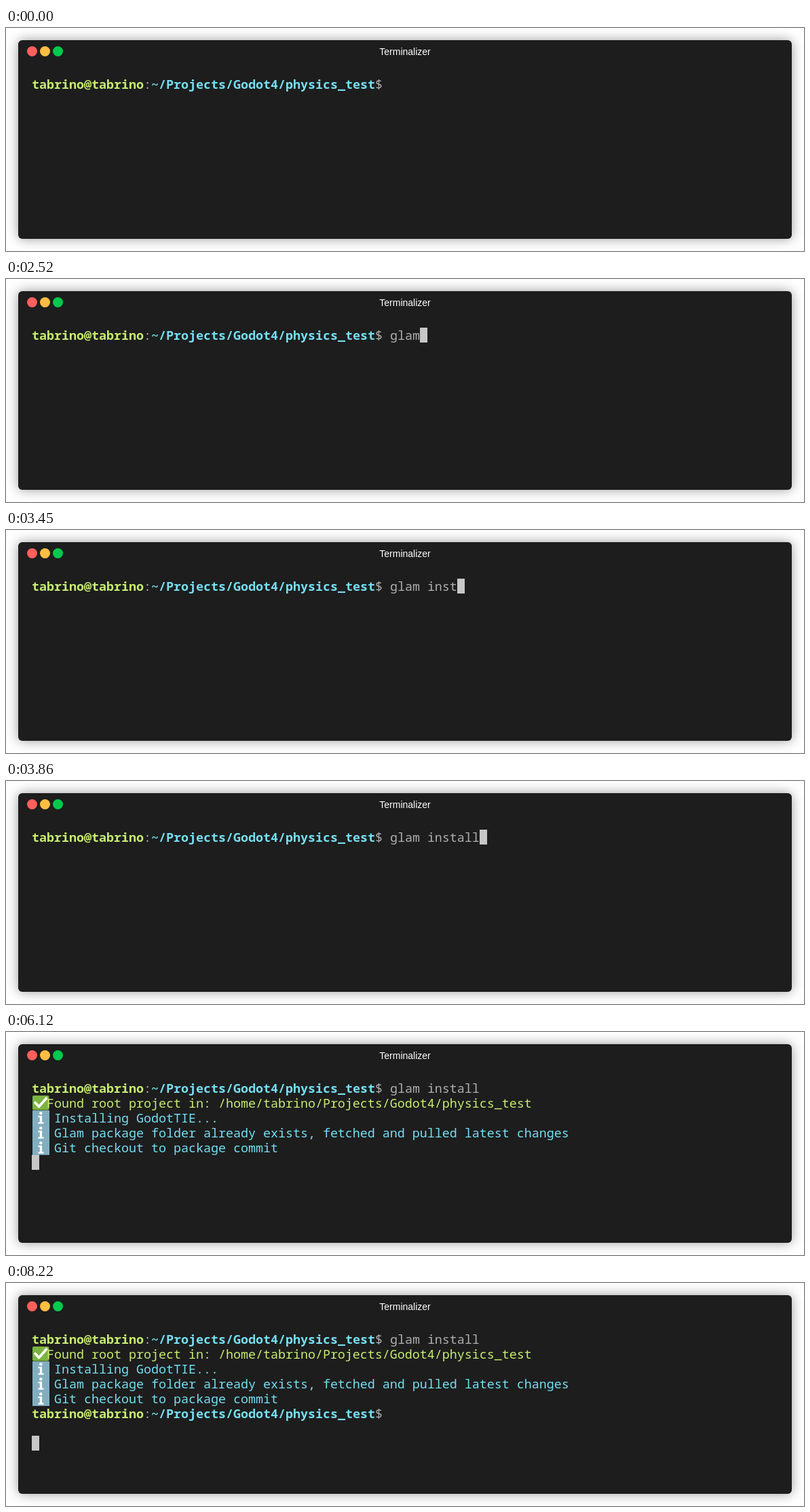
Write an HTML page that moves like this. It is 1176x330 px and loops after 8450 ms.

```html
<!DOCTYPE html>
<html lang="en">
<head>
<meta charset="utf-8">
<title>Terminal</title>
<style>
  html, body { margin: 0; width: 100%; height: 100%; overflow: hidden; background: #fff; }
  .window {
    position: absolute; left: 18px; top: 18px; width: 1140px; height: 294px;
    border-radius: 6px; background: #1d1d1d; box-shadow: 0 0 18px rgba(0, 0, 0, .4);
  }
  .dot { position: absolute; top: 9px; width: 15px; height: 15px; border-radius: 50%; }
  .title {
    position: absolute; left: 0; right: 0; top: 9px; text-align: center; color: #fff;
    font: 14px/16px "Liberation Sans", Arial, sans-serif;
  }
  /* 18.333px gives an 11px character cell */
  .screen {
    position: absolute; left: 20px; top: 54px; color: #afafaf;
    font: 18.3333px/22px "Noto Sans Mono", monospace; font-variant-ligatures: none;
  }
  .row { position: absolute; left: 0; height: 22px; white-space: pre; visibility: hidden; }
  .row span { position: relative; }
  .icon { position: absolute; left: 0; top: 0; width: 26px; height: 22px; }
  .user { color: #c8ed71; font-weight: 700; }
  .path { color: #75dff2; font-weight: 700; }
  .ok { color: #c8ed71; }
  .info { color: #75dff2; }
  .cursor { position: absolute; width: 11px; height: 22px; background: #c7c7c7; }
</style>
</head>
<body>
<svg width="0" height="0" style="position:absolute">
  <symbol id="ok" viewBox="0 0 26 22">
    <rect x="1" width="24.5" height="21.5" rx="2" fill="#7cb342"/>
    <path d="M5 10.5l5.5 6L21.5 4" fill="none" stroke="#fff" stroke-width="3.6" stroke-linecap="round" stroke-linejoin="round"/>
  </symbol>
  <symbol id="info" viewBox="0 0 26 22">
    <rect x="1" width="25" height="22" fill="#82aec0"/>
    <circle cx="13.3" cy="4.2" r="2.2" fill="#fff"/>
    <path d="M9.5 8h5.6v9.6h2.4v2.2h-8v-2.2h2.3v-7.4H9.5z" fill="#fff"/>
  </symbol>
</svg>
<div class="window">
  <div class="dot" style="left:13px;background:#ff605c"></div>
  <div class="dot" style="left:32px;background:#ffbd44"></div>
  <div class="dot" style="left:51px;background:#00ca4e"></div>
  <div class="title">Terminalizer</div>
  <div class="screen" id="screen"></div>
</div>
<script>
  const LOOP = 8450, CELL = 11, LINE = 22, PROMPT_COLS = 48;
  const USER = 'tabrino', DIR = 'Projects/Godot4/physics_test';
  const COMMAND = 'glam install';
  const KEYS = [1880, 2070, 2230, 2520, 2730, 2960, 3210, 3350, 3450, 3560, 3660, 3860];

  const span = (cls, text) => `<span class="${cls}">${text}</span>`;
  const icon = (id) => `<svg class="icon"><use href="#${id}"/></svg>`;
  const prompt = span('user', `${USER}@${USER}`) + ':' + span('path', `~/${DIR}`) + '$ ';
  const note = (text) => icon('info') + span('info', '   ' + text);

  // Each line: time it appears, content
  const LINES = [
    [0, prompt + '<span id="typed"></span>'],
    [4120, icon('ok') + span('ok', `  Found root project in: /home/${USER}/${DIR}`)],
    [4120, note('Installing GodotTIE...')],
    [6120, note('Glam package folder already exists, fetched and pulled latest changes')],
    [6120, note('Git checkout to package commit')],
    [6220, prompt],
  ];

  // Cursor jumps after the command: time, row, column
  const JUMPS = [[4120, 3, 0], [6120, 5, 0], [6220, 5, PROMPT_COLS], [8220, 7, 0]];

  const screen = document.getElementById('screen');
  screen.innerHTML = LINES.map(([, html], i) =>
    `<div class="row" style="top:${i * LINE}px">${html}</div>`).join('') + '<div class="cursor"></div>';
  const rows = screen.querySelectorAll('.row');
  const typed = document.getElementById('typed');
  const cursor = screen.querySelector('.cursor');

  function draw() {
    const t = performance.now() % LOOP;
    const count = KEYS.filter((k) => t >= k).length;
    typed.textContent = COMMAND.slice(0, count);
    LINES.forEach(([start], i) => { rows[i].style.visibility = t >= start ? 'visible' : 'hidden'; });

    let row = 0, col = PROMPT_COLS + count;
    for (const [start, r, c] of JUMPS) if (t >= start) [row, col] = [r, c];
    cursor.style.visibility = count ? 'visible' : 'hidden';
    cursor.style.left = col * CELL + 'px';
    cursor.style.top = row * LINE + 'px';
    requestAnimationFrame(draw);
  }
  draw();
</script>
</body>
</html>
```
